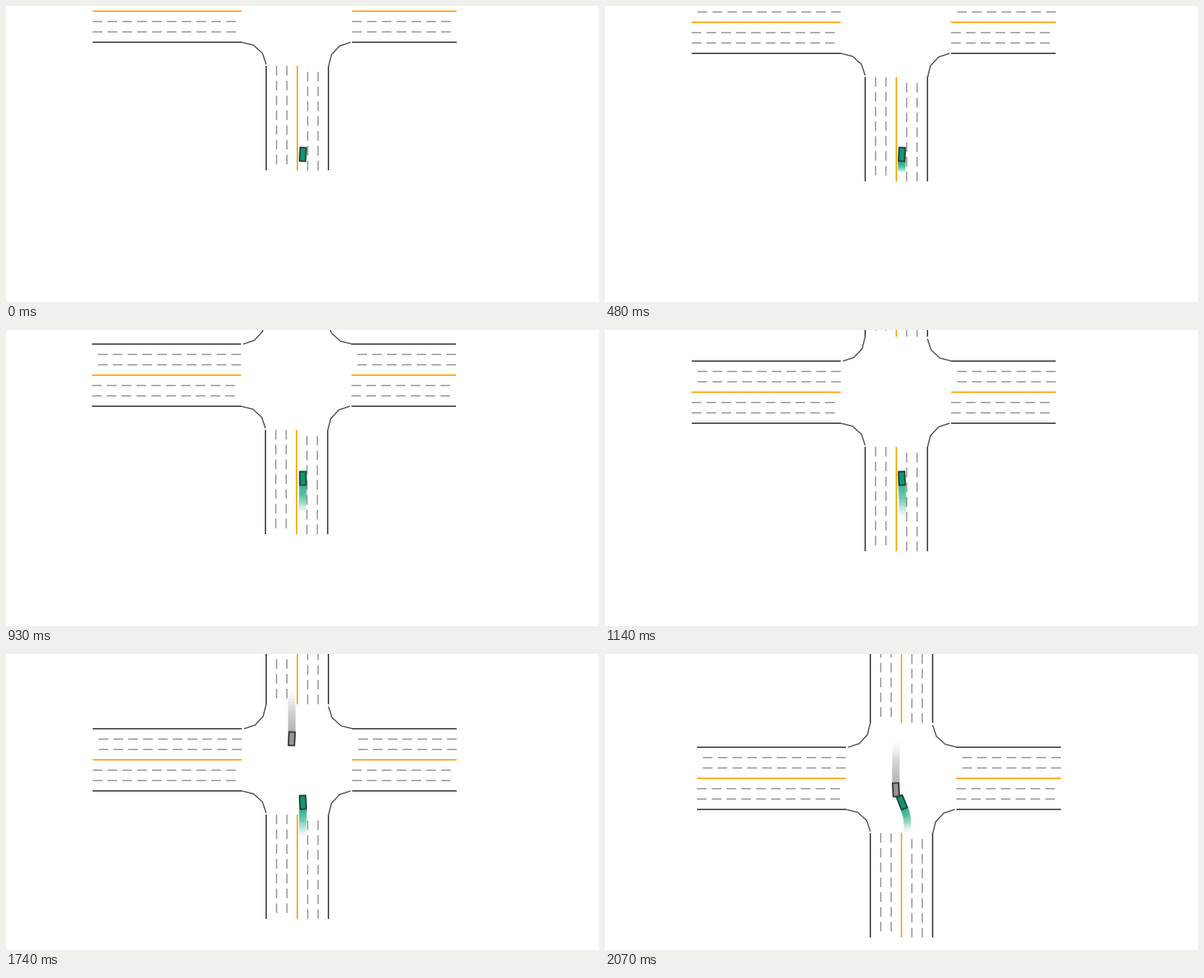
These frames come from a looping animation (800 by 400 pixels, 2.1 s). An HTML page with a canvas:

```html
<!DOCTYPE html>
<html>
<head>
<meta charset="utf-8">
<style>
html, body { margin: 0; width: 100%; height: 100%; overflow: hidden; background: #fff; }
canvas { display: block; }
</style>
</head>
<body>
<canvas id="stage" width="800" height="400"></canvas>
<script>
const ctx = document.getElementById('stage').getContext('2d');
const LOOP = 2100, HOLD = 120, STEP = 30, TRAIL = 14;
const GREEN = '#009e73', GREY = '#969696', EDGE = '#3c3c3c';
const ROAD = '#555555', DASH = '#aaaaaa', ORANGE = '#ffaa1e';

// Smooth curve through [step, value] points
function curve(pts) {
  const slope = i => (pts[i + 1][1] - pts[i][1]) / (pts[i + 1][0] - pts[i][0]);
  const last = pts.length - 1;
  const tan = pts.map((p, i) => {
    if (i === 0) return slope(0);
    if (i === last) return slope(last - 1);
    const a = p[0] - pts[i - 1][0], b = pts[i + 1][0] - p[0];
    return (slope(i - 1) * b + slope(i) * a) / (a + b);
  });
  return n => {
    let i = 0;
    while (i < last - 1 && n > pts[i + 1][0]) i++;
    const [t0, v0] = pts[i], [t1, v1] = pts[i + 1];
    const h = t1 - t0, u = (n - t0) / h, w = 1 - u;
    return v0 * w * w * (1 + 2 * u) + v1 * u * u * (3 - 2 * u)
      + h * u * w * (tan[i] * w - tan[i + 1] * u);
  };
}

// Centre of the crossing on screen, and heading of the green car in degrees
const roadX = curve([[0, 393.3], [13, 392.7], [21, 392.1], [35, 392.9], [45, 393.1],
  [55, 393], [58, 393.8], [61, 395.8], [66, 400]]);
const roadY = curve([[0, 7], [5, 10.7], [13, 22], [21, 40], [28, 60.8], [35, 84],
  [45, 116], [55, 143], [66, 168]]);
const heading = curve([[0, 3], [13, 3], [21, 3], [35, -3], [45, 3], [55, -3], [60, -14], [66, -22]]);

const greenPose = n => [400 - Math.round(roadX(n)), 200 - Math.round(roadY(n)), heading(n)];
const greyPose = n => [-8, -69 + 4 * (n - 45), n < 60 ? 3 : -3];

function line(x1, y1, x2, y2, color, dashed) {
  ctx.strokeStyle = color;
  ctx.lineWidth = 2;
  ctx.setLineDash(dashed ? [13, 7] : []);
  ctx.beginPath();
  ctx.moveTo(x1, y1);
  ctx.lineTo(x2, y2);
  ctx.stroke();
}

// One arm along an axis; the dashes start at d1 on one side and d2 on the other
function arm(vertical, from, to, d1, d2, end1, end2) {
  const put = (off, a, b, color, dashed) => vertical
    ? line(off, a, off, b, color, dashed)
    : line(a, off, b, off, color, dashed);
  put(0, from, to, ORANGE);
  for (const off of [14, 28]) {
    put(off, d1, end1, DASH, true);
    put(-off, d2, end2, DASH, true);
  }
  return off => put(off, from, to, ROAD);
}

function roads() {
  const arms = [
    arm(false, -276, -75, -276, -268, -82, -75),
    arm(false, 74, 215, 74, 82, 207, 215),
    arm(true, 74, 215, 82, 74, 215, 207),
    arm(true, -276, -75, -268, -276, -75, -83)
  ];
  for (const side of arms) {
    side(-42);
    side(42);
  }
  ctx.setLineDash([]);
  ctx.lineWidth = 1.6;
  for (let q = 0; q < 4; q++) {
    ctx.beginPath();
    ctx.moveTo(-75, 42);
    ctx.lineTo(-59, 46);
    ctx.lineTo(-47, 57);
    ctx.lineTo(-42, 72);
    ctx.stroke();
    ctx.rotate(Math.PI / 2);
  }
}

function box([x, y, deg], color, alpha) {
  ctx.save();
  ctx.translate(x + 0.5, y + 0.5);
  ctx.rotate(deg * Math.PI / 180);
  ctx.globalAlpha = alpha;
  ctx.fillStyle = color;
  ctx.fillRect(-5, -10, 10, 20);
  if (alpha === 1) {
    ctx.strokeStyle = EDGE;
    ctx.lineWidth = 2;
    ctx.strokeRect(-4, -9, 8, 18);
  }
  ctx.restore();
}

function car(pose, n, color) {
  for (let k = Math.min(TRAIL, n); k > 0; k--) {
    box(pose(n - k), color, 0.25 * (1 - k / (TRAIL + 1)));
  }
  box(pose(n), color, 1);
}

function draw(ms) {
  const t = ms % LOOP;
  const n = t < HOLD ? 0 : Math.floor((t - HOLD) / STEP) + 1;
  ctx.setTransform(1, 0, 0, 1, 0, 0);
  ctx.fillStyle = '#fff';
  ctx.fillRect(0, 0, 800, 400);
  ctx.translate(Math.round(roadX(n)), Math.round(roadY(n)));
  roads();
  car(greyPose, n, GREY);
  car(greenPose, n, GREEN);
}

const start = performance.now();
function tick(now) {
  draw(Math.max(0, now - start));
  requestAnimationFrame(tick);
}
draw(0);
requestAnimationFrame(tick);
</script>
</body>
</html>
```
